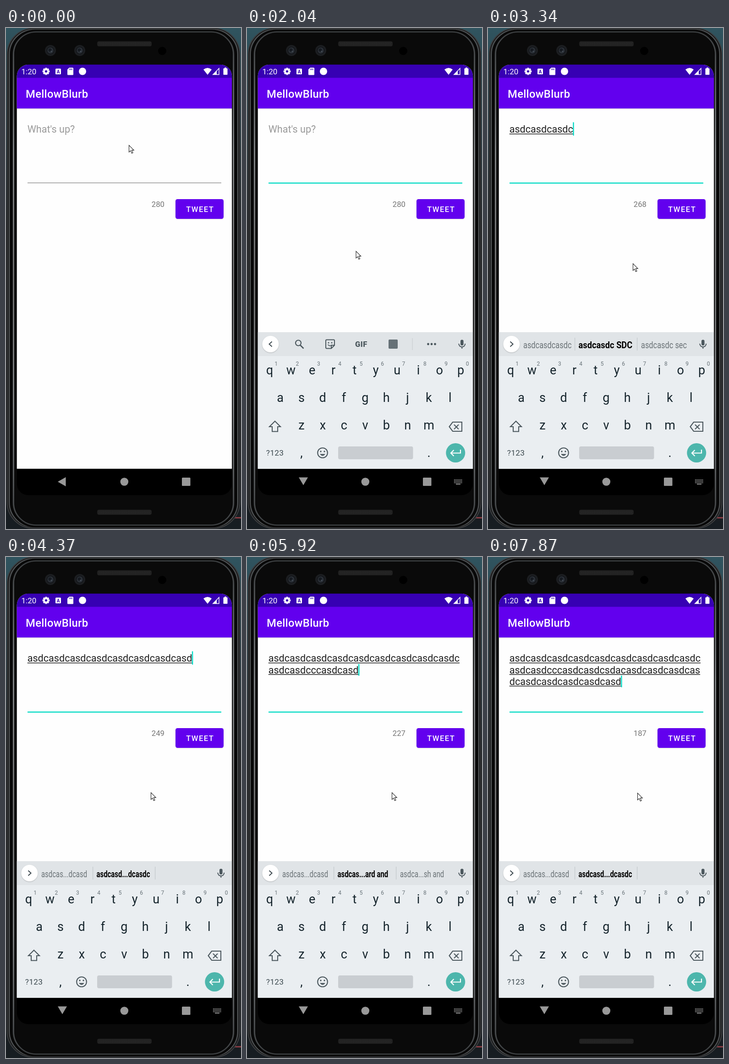
These frames come from a looping animation (513x1092 px, 8000 ms). An HTML page with a canvas:

```html
<!DOCTYPE html>
<html lang="en">
<head>
<meta charset="utf-8">
<title>Phone composer</title>
<style>
html, body { margin: 0; width: 100%; height: 100%; overflow: hidden; background: #111; }
canvas { display: block; width: 513px; height: 1092px; }
</style>
</head>
<body>
<canvas id="stage"></canvas>
<script>
const W = 513, H = 1092, LOOP = 8000;
const dpr = window.devicePixelRatio || 1;
function setup(canvas) {
  canvas.width = W * dpr;
  canvas.height = H * dpr;
  const c = canvas.getContext('2d');
  c.scale(dpr, dpr);
  return c;
}
const stage = setup(document.getElementById('stage'));
const layer = setup(document.createElement('canvas'));
let ctx = stage;

const FONT = 'Roboto, "Noto Sans", sans-serif';
const TEAL = '#03dac5', PURPLE = '#6200ee', KEY = '#15242c', ICON = '#4b575d';
const NAV_TOP = 960.7;
const MESSAGE = 'asdcasdcasdcasdcasdcasdcasdcasdcasdc' +
  'asdcasdcccasdcasdcsdacasdcasdcasdcas' + 'dcasdcasdcasdcasdcasd';
const LINE = 36;

// Typing bursts: first time, last time, steps, characters at each end.
const BURSTS = [
  [2590, 3340, 7, 1, 12], [3490, 3490, 1, 14, 14], [3650, 4370, 6, 17, 31],
  [4490, 4610, 2, 33, 35], [4760, 5150, 4, 37, 44], [5680, 5920, 3, 46, 53],
  [6070, 6610, 5, 56, 70], [6730, 7720, 8, 72, 90], [7870, 7870, 1, 93, 93]
];

function paint(fill, stroke, lw) {
  if (fill) { ctx.fillStyle = fill; ctx.fill(); }
  if (stroke) { ctx.strokeStyle = stroke; ctx.lineWidth = lw; ctx.stroke(); }
}
function rect(x, y, w, h, fill) {
  ctx.fillStyle = fill;
  ctx.fillRect(x, y, w, h);
}
function box(x, y, w, h, r, fill, stroke, lw = 1) {
  ctx.beginPath();
  ctx.roundRect(x, y, w, h, r);
  paint(fill, stroke, lw);
}
function disc(x, y, r, fill, stroke, lw = 1) {
  ctx.beginPath();
  ctx.arc(x, y, r, 0, Math.PI * 2);
  paint(fill, stroke, lw);
}
function path(d, x, y, fill, stroke, lw = 1) {
  ctx.save();
  ctx.translate(x, y);
  const p = new Path2D(d);
  if (fill) { ctx.fillStyle = fill; ctx.fill(p); }
  if (stroke) { ctx.strokeStyle = stroke; ctx.lineWidth = lw; ctx.stroke(p); }
  ctx.restore();
}
function text(s, x, y, size, color, weight = 400, align = 'left', spacing = 0) {
  ctx.font = `${weight} ${size}px ${FONT}`;
  ctx.letterSpacing = spacing + 'px';
  ctx.textAlign = align;
  ctx.fillStyle = color;
  ctx.fillText(s, x, y);
}
function fade(y0, y1, ...colors) {
  const g = ctx.createLinearGradient(0, y0, 0, y1);
  colors.forEach((c, i) => g.addColorStop(i / (colors.length - 1), c));
  return g;
}

function speaker(y) {
  box(199, y, 119, 11, 4, '#202020');
  for (let row = 0; row < 3; row++)
    for (let x = 202 + row % 2; x < 315; x += 2.5) rect(x, y + 2.5 + row * 2.5, 1, 1, '#353535');
}
function camera(x) {
  disc(x, 49, 12, '#1c1e21');
  disc(x, 49, 7.5, '#2a2f36', '#111418', 1.5);
  disc(x - 1, 48, 3.5, '#15191f');
  disc(x + 2, 51, 1.5, '#46505a');
}
function drawPhone() {
  rect(0, 0, W, H, fade(0, H, '#30545f', '#263c46', '#17191b', '#17191b', '#17191b', '#171d22'));
  rect(500, 1066, 13, 3, '#873c43');
  box(2.5, 0.5, 508, 1090, 57, '#1a1b1c', '#3c3e40', 2);
  box(7, 3.5, 499, 1084, 54, null, '#55585a', 2);
  box(11.5, 6, 490, 1080, 52, null, '#080808', 5);
  box(16.5, 8.5, 480, 1075, 49, '#0a0a0a', fade(0, H, '#3a3d3f', '#8b8e90', '#777', '#8b8e90', '#3a3d3f'), 2.6);
  box(20, 11, 473, 1070, 46, '#0a0a0a');
  speaker(29);
  speaker(1050);
  camera(97);
  camera(161);
  disc(341, 50, 9, '#000');
}

function drawStatus() {
  rect(23, 79, 471, 30, '#3700b3');
  text('1:20', 33.5, 101, 17, '#fff');
  for (let i = 0; i < 8; i++) {
    ctx.save();
    ctx.translate(87.5, 94.5);
    ctx.rotate(i * Math.PI / 4);
    rect(-2, -7.8, 4, 4, '#fff');
    ctx.restore();
  }
  disc(87.5, 94.5, 4.3, null, '#fff', 3.4);
  box(108, 88.5, 12, 12.5, 1.5, '#fff');
  text('A', 114, 98.8, 10, '#3700b3', 700, 'center');
  path('M4 0H11.5Q13 0 13 1.5V14.5Q13 16 11.5 16H1.5Q0 16 0 14.5V4Z', 134, 86.5, '#fff');
  for (let i = 0; i < 3; i++) rect(138.3 + i * 2.5, 88.5, 1.3, 3, '#3700b3');
  disc(167, 94.5, 8, '#fff');
  path('M0 4Q9 -3 18 4L9 15.5Z', 431, 86.5, '#fff');
  path('M14 1V14.5H.8Z', 451, 87, null, '#fff', 1.4);
  path('M9 6V14.5H.8Z', 451, 87, '#fff');
  box(474.5, 88, 9, 14, 1, '#fff');
  rect(477, 86.2, 4, 2.5, '#fff');
}
function drawApp(count, focused) {
  rect(23, 80, 471, NAV_TOP - 80, '#fefefe');
  drawStatus();
  rect(23, 175, 471, 3, fade(175, 178, 'rgba(0,0,0,.14)', 'rgba(0,0,0,0)'));
  rect(23, 108.6, 471, 66.8, PURPLE);
  text('MellowBlurb', 43, 151.5, 23.8, '#fff', 500, 'left', .3);
  if (focused) rect(47, 336.8, 423, 2.4, TEAL);
  else rect(47, 337, 423, 1.1, '#747474');
  text(String(280 - count), 346, 390, 16.7, '#757575', 400, 'right');
  ctx.save();
  ctx.shadowColor = 'rgba(0,0,0,.14)';
  ctx.shadowBlur = 2 * dpr;
  ctx.shadowOffsetY = dpr;
  box(370, 373, 105, 43, 4.5, PURPLE);
  ctx.restore();
  text('TWEET', 423.7, 401, 16.6, '#fff', 500, 'center', 1.45);
}
function drawField(typed, caret) {
  const size = 21.6, x = 46.7;
  let row = 0, width = 0;
  if (!typed) text("What's up?", x, 228.3, size, '#9a9a9a');
  for (let i = 0; i < typed.length; i += LINE, row++) {
    const part = typed.slice(i, i + LINE), y = 228.3 + row * 25.2;
    text(part, x, y, size, '#212121');
    width = ctx.measureText(part).width;
    rect(x, y + 1.9, width, 1.5, '#212121');
  }
  if (!caret) return;
  const last = Math.max(0, row - 1);
  rect(x + width - (width ? .5 : 0), last ? 208 + last * 25.2 : 205.5, 2.4, last ? 25.5 : 29, TEAL);
}

function suggestions(typed) {
  const n = typed.length;
  if (n <= 14) {
    const stem = typed.slice(0, -4);
    return [typed, (stem + ' SDC').trim(), (stem + ' sec').trim()];
  }
  const first = typed.slice(0, 6) + '...' + 'dcasd';
  return n >= 53 && n < 93
    ? [first, 'asdcas...ard and', 'asdca...sh and']
    : [first, 'asdcasd...dcasdc', ''];
}
function drawSuggestions(typed) {
  const words = suggestions(typed);
  [77, 197.5, 334].forEach((x, i) => {
    const s = words[i], bold = i === 1;
    ctx.save();
    ctx.translate(x, 697.5);
    ctx.scale(s.includes('...') ? .71 : bold ? .87 : .78, 1);
    text(s, 0, 0, 21, bold ? '#000' : '#6a7276', bold ? 700 : 400);
    ctx.restore();
  });
  rect(189, 675, 1.2, 28, '#c3c8cb');
  rect(325, 675, 1.2, 28, '#c3c8cb');
}
function drawTools() {
  disc(112, 686.5, 6, null, ICON, 2.2);
  path('M116 691L123.5 698.5', 0, 0, null, ICON, 2.6);
  path('M2 0H17Q19 0 19 2V12L12 19H2Q0 19 0 17V2Q0 0 2 0ZM19 12H14Q12 12 12 14V19', 172, 679.5, null, ICON, 2);
  disc(178, 686, 1.5, ICON);
  disc(185, 686, 1.5, ICON);
  path('M176.5 690Q181 695 185 690.5', 0, 0, null, ICON, 1.7);
  text('GIF', 249.5, 695, 16.5, ICON, 900, 'center', .5);
  box(309, 679, 20, 20, 2, '#667177');
  rect(360.5, 676, 1.2, 26, '#c9ced1');
  for (let i = 0; i < 3; i++) disc(395.5 + i * 7.5, 689, 2.4, ICON);
}
function drawKeys() {
  const rows = [['qwertyuiop', 49.5, 755], ['asdfghjkl', 72.5, 815], ['zxcvbnm', 119, 875]];
  for (const [letters, x, y] of rows)
    [...letters].forEach((c, i) => text(c, x + i * 46.35, y, 27, KEY, 400, 'center'));
  for (let i = 0; i < 10; i++)
    text(String((i + 1) % 10), 63.5 + i * 46.4, 736, 12, '#687278', 400, 'center');
  path('M61 857L73 869H67V879.5H55V869H49Z', 0, 0, null, ICON, 2.1);
  path('M449 859H469V879H449L441.5 869Z', 0, 0, null, ICON, 2.1);
  path('M452 864.5L462 874.5M462 864.5L452 874.5', 0, 0, null, ICON, 2.1);
  text('?123', 61, 932, 17.2, '#3c494f', 400, 'center', .3);
  text(',', 119, 935, 27, KEY, 400, 'center');
  text('.', 397, 935, 27, KEY, 400, 'center');
  disc(165, 926, 10.8, null, ICON, 2.1);
  disc(161, 923, 1.7, ICON);
  disc(169, 923, 1.7, ICON);
  path('M159 928.5Q165 936.5 171 928.5Z', 0, 0, ICON);
  box(199, 912, 163.5, 28, 4, '#c9cdd1');
  disc(455.3, 926, 21, '#4db6ac');
  path('M466 919V926.5H445.5M451.5 920L445 926.5L451.5 933', 0, 0, null, '#fff', 2.2);
}
function drawKeyboard(typed) {
  rect(23, 663, 471, 52, '#e0e4e7');
  rect(23, 715, 471, NAV_TOP - 715, '#eaeef1');
  ctx.save();
  ctx.shadowColor = 'rgba(0,0,0,.2)';
  ctx.shadowBlur = 2 * dpr;
  ctx.shadowOffsetY = dpr;
  disc(51.3, 689, 18, '#fff');
  ctx.restore();
  path(typed ? 'M-3 -5.5L3 0L-3 5.5' : 'M3 -5.5L-3 0L3 5.5', 51.5, 689, null, '#3c484e', 2);
  if (typed) drawSuggestions(typed);
  else drawTools();
  box(466, 679.5, 6.6, 12.5, 3.3, ICON);
  path('M462.3 688Q463 695 469.3 695T476.3 688M469.3 695V699', 0, 0, null, ICON, 2);
  drawKeys();
}
// The sliding keyboard fades as one flat layer.
function drawFadedKeyboard(typed, shift, alpha) {
  ctx = layer;
  ctx.clearRect(0, 0, W, H);
  drawKeyboard(typed);
  ctx = stage;
  ctx.save();
  ctx.globalAlpha = alpha;
  ctx.drawImage(layer.canvas, 0, shift, W, H);
  ctx.restore();
}
function drawNav(mode) {
  const c = 'rgba(255,255,255,.6)';
  path(['M113 989L130.5 979V999Z', 'M118 976.5L135.5 987L118 997Z', 'M113 979.5H133L123 996.5Z'][mode], 0, 0, c);
  disc(258.3, 989, 8.8, c);
  box(384, 980, 18.5, 18, 1.5, c);
  if (!mode) return;
  for (let r = 0; r < 3; r++)
    for (let i = 0; i < 6; i++) rect(452 + i * 3.1, 984 + r * 3.1, 1.9, 1.9, c);
  rect(456, 993.3, 10, 1.8, c);
}
function drawPointer([x, y]) {
  path('M.5 .5V15.5L4 12.3L6.5 18L9 16.9L6.5 11.4H11.2Z', x, y, '#fff', '#222', 1.1);
}

function charsAt(t) {
  let n = 0;
  for (const [t0, t1, steps, a, b] of BURSTS) {
    if (t < t0) break;
    const k = steps > 1 ? Math.min(1, Math.floor((t - t0) / (t1 - t0) * (steps - 1) + 1e-6) / (steps - 1)) : 1;
    n = Math.round(a + (b - a) * k);
  }
  return n;
}
function pointerAt(t) {
  if (t < 1100) return [268, 255];
  if (t < 1890) {
    const k = Math.min(5, Math.floor((t - 1100) / 127.5) + 1) / 5;
    return [268 - 30 * k, 255 + 219 * k];
  }
  if (t < 2160) return [237.5, 486];
  if (t < 2280) return [280, 501];
  return t < 7870 ? [316, 513] : [326, 514];
}
function caretAt(t) {
  return t >= 430 && t < 1100 || t >= 1610 && t < 2040 || t >= 2590;
}

function draw(t) {
  drawPhone();
  const n = charsAt(t), typed = MESSAGE.slice(0, n);
  const mode = t < 710 ? 0 : t < 830 ? 1 : 2;
  ctx.save();
  ctx.beginPath();
  ctx.roundRect(23.7, 79.8, 469.4, 938.4, 25);
  ctx.clip();
  rect(23, 79, 471, 940, '#000');
  drawApp(n, t >= 430);
  drawField(typed, caretAt(t));
  if (mode === 1) drawFadedKeyboard(typed, 34, .7);
  if (mode === 2) drawKeyboard(typed);
  drawNav(mode);
  ctx.restore();
  drawPointer(pointerAt(t));
}

const start = performance.now();
function tick() {
  draw((performance.now() - start) % LOOP);
  requestAnimationFrame(tick);
}
tick();
</script>
</body>
</html>
```
